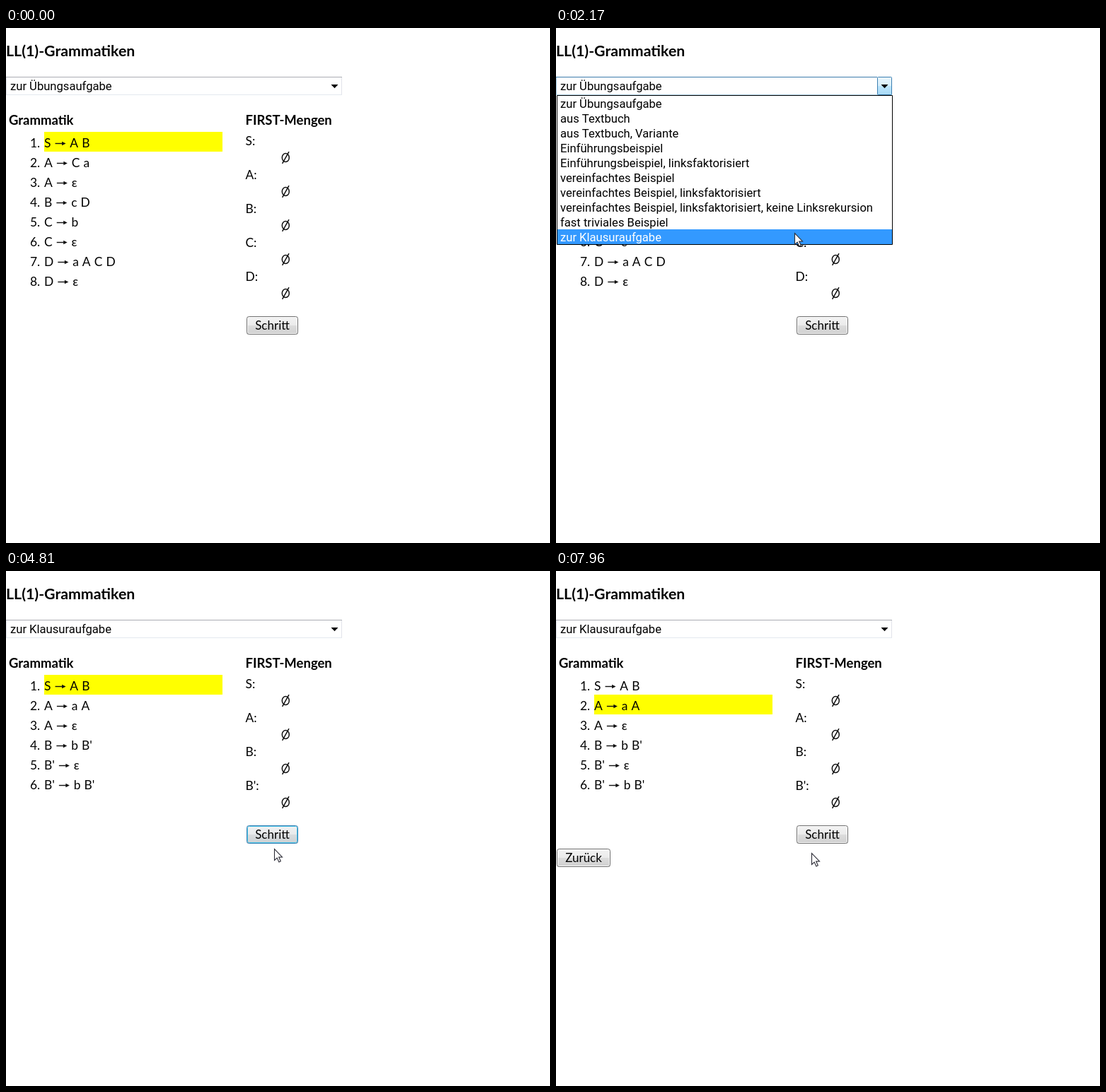
Animation, 769 px wide and 729 px high, one loop 7990 ms. Source, as an HTML page with a canvas:

```html
<!DOCTYPE html>
<html lang="de">
<head>
<meta charset="utf-8">
<title>LL(1)-Grammatiken</title>
<style>
html, body { margin: 0; width: 100%; height: 100%; overflow: hidden; background: #fff; }
canvas { display: block; }
</style>
</head>
<body>
<canvas id="stage" width="769" height="729"></canvas>
<script>
const ctx = document.getElementById('stage').getContext('2d');
const LOOP = 7990, STEP = 30;
const BODY = '17.4px Lato, "Open Sans", sans-serif';
const BOLD = 'bold 18.5px Lato, sans-serif';
const TITLE = 'bold 21.3px Lato, sans-serif';
const LABEL = '17px Lato, sans-serif';
const MENU = '16.6px Roboto, sans-serif';

const options = [
  'zur Übungsaufgabe', 'aus Textbuch', 'aus Textbuch, Variante',
  'Einführungsbeispiel', 'Einführungsbeispiel, linksfaktorisiert',
  'vereinfachtes Beispiel', 'vereinfachtes Beispiel, linksfaktorisiert',
  'vereinfachtes Beispiel, linksfaktorisiert, keine Linksrekursion',
  'fast triviales Beispiel', 'zur Klausuraufgabe'
];
const exercise = {
  rules: ['S → A B', 'A → C a', 'A → ε', 'B → c D', 'C → b', 'C → ε', 'D → a A C D', 'D → ε'],
  symbols: ['S', 'A', 'B', 'C', 'D']
};
const exam = {
  rules: ['S → A B', 'A → a A', 'A → ε', "B → b B'", "B' → ε", "B' → b B'"],
  symbols: ['S', 'A', 'B', "B'"]
};

// Pointer way points: time, x, y
const way = [
  [100, 722, 13], [400, 600, 58], [610, 498, 88], [730, 468, 82], [1630, 468, 82],
  [1810, 356, 223], [2170, 337, 290], [3130, 337, 290], [3460, 262, 360],
  [3640, 247, 395], [3880, 277, 416], [3940, 305, 442], [4180, 350, 469],
  [4540, 404, 430], [4750, 390, 403], [4810, 379, 393], [5230, 383, 368],
  [5740, 383, 368], [5770, 379, 368], [6010, 379, 368], [6550, 116, 210],
  [6670, 103, 190], [6760, 109, 205], [7450, 109, 205], [7720, 240, 449], [7960, 361, 399]
];

function slope(i, axis) {
  const a = way[i], b = way[i + 1];
  return a && b ? (b[axis] - a[axis]) / (b[0] - a[0]) : 0;
}

function tangent(i, axis) {
  const a = slope(i - 1, axis), b = slope(i, axis);
  return a * b > 0 ? 2 * a * b / (a + b) : 0;
}

// Monotone cubic interpolation, so that rests stay still
function pointer(t) {
  if (t <= way[0][0]) return way[0].slice(1);
  const i = way.findIndex((p, k) => k + 1 === way.length || t < way[k + 1][0]);
  if (i + 1 === way.length) return way[i].slice(1);
  const span = way[i + 1][0] - way[i][0], u = (t - way[i][0]) / span;
  return [1, 2].map(axis =>
    way[i][axis] * (1 + 2 * u) * (1 - u) ** 2 +
    way[i + 1][axis] * u * u * (3 - 2 * u) +
    span * u * (1 - u) * (tangent(i, axis) * (1 - u) - tangent(i + 1, axis) * u));
}

function text(str, x, y, font, color = '#000', align = 'left') {
  ctx.font = font;
  ctx.fillStyle = color;
  ctx.textAlign = align;
  ctx.fillText(str, x, y);
}

function rect(x, y, w, h, color) {
  ctx.fillStyle = color;
  ctx.fillRect(x, y, w, h);
}

function shape(points, fill) {
  ctx.beginPath();
  for (const [x, y] of points) ctx.lineTo(x, y);
  ctx.closePath();
  ctx.fillStyle = fill;
  ctx.fill();
}

function shade(y, h, colors) {
  const g = ctx.createLinearGradient(0, y, 0, y + h);
  [0, 0.5, 0.5, 1].forEach((stop, i) => g.addColorStop(stop, colors[i]));
  return g;
}

function frame(x, y, w, h, r, color) {
  ctx.beginPath();
  ctx.roundRect(x + 0.5, y + 0.5, w - 1, h - 1, r);
  ctx.strokeStyle = color;
  ctx.lineWidth = 1;
  ctx.stroke();
}

const looks = {
  normal: { fill: ['#f3f3f3', '#ebebeb', '#dddddd', '#cfcfcf'], edge: '#707070', inner: '#fafafa' },
  focus: { fill: ['#f0f2f3', '#e8eaeb', '#dadddf', '#cbd0d2'], edge: '#3c7fb1', inner: '#48c4e8' },
  hover: { fill: ['#eaf6fd', '#d9f0fc', '#bee6fd', '#a7d9f5'], edge: '#3c7fb1', inner: '#f0faff' },
  press: { fill: ['#e5f4fc', '#c4e5f6', '#98d1ef', '#68b3db'], edge: '#2c628b', inner: '#9eb0ba' }
};

function button(label, x, y, w, h, look) {
  const { fill, edge, inner } = looks[look];
  ctx.beginPath();
  ctx.roundRect(x, y, w, h, 3);
  ctx.fillStyle = shade(y, h, fill);
  ctx.fill();
  frame(x + 1, y + 1, w - 2, h - 2, 2, inner);
  frame(x, y, w, h, 3, edge);
  text(label, x + w / 2, y + 19, LABEL, '#000', 'center');
}

function arrow(x, y) {
  rect(x, y - 0.7, 11, 1.4, '#111');
  shape([[x + 9.5, y - 2.7], [x + 15, y], [x + 9.5, y + 2.7]], '#111');
}

function rule(str, n, active) {
  const y = 169 + 28 * n;
  if (active) rect(54, y - 22, 252, 28, '#ff0');
  text(n + 1 + '.', 34, y, BODY);
  let x = 54;
  for (const part of str.split(' ')) {
    if (part === '→') {
      arrow(x + 1, y - 5.5);
      x += 21.8;
    } else {
      text(part, x, y, BODY);
      x += ctx.measureText(part).width + 5.1;
    }
  }
}

function emptySet(x, y) {
  ctx.strokeStyle = '#111';
  ctx.lineWidth = 1.5;
  ctx.beginPath();
  ctx.ellipse(x, y, 5, 6, 0, 0, 7);
  ctx.moveTo(x - 4.7, y + 8.3);
  ctx.lineTo(x + 4.7, y - 8.3);
  ctx.stroke();
}

function select(value, hot, pressed) {
  const [top, side, bottom] = hot
    ? ['#3d7bad', '#a4c9e3', '#b7d9ed']
    : ['#abadb3', '#e2e3ea', '#e3e9ef'];
  rect(0, 69, 475, 26, '#fff');
  frame(0, 69, 475, 26, 0, side);
  rect(0, 94, 475, 1, bottom);
  rect(0, 69, 475, 1, top);
  if (hot) {
    const { fill, edge } = looks[pressed ? 'press' : 'hover'];
    rect(454, 69, 21, 26, shade(69, 26, fill));
    frame(454, 69, 21, 26, 1, edge);
  }
  text(value, 6, 88, MENU);
  shape([[459.5, 80], [469.5, 80], [464.5, 85.2]], '#000');
}

function menu(active) {
  rect(1, 95, 475, 212, '#fff');
  frame(1, 95, 475, 212, 0, '#000');
  options.forEach((name, i) => {
    if (i === active) rect(2, 96 + 21 * i, 473, 21, '#39f');
    text(name, 6, 113 + 21 * i, MENU, i === active ? '#fff' : '#000');
  });
}

function cursor([x, y]) {
  ctx.save();
  ctx.translate(Math.round(x) + 0.5, Math.round(y) + 0.5);
  shape([[0, 0], [0, 16], [3.7, 12.6], [6.4, 18.4], [8.8, 17.3], [6.2, 11.6], [11, 11.4]], '#fff');
  ctx.strokeStyle = '#2b2b35';
  ctx.lineWidth = 1.1;
  ctx.stroke();
  ctx.restore();
}

function draw(t) {
  const at = pointer(t);
  const open = t >= 910 && t < 2560;
  const data = t < 2710 ? exercise : exam;
  const step = t < 7030 ? 0 : 1;

  rect(0, 0, 769, 729, '#fff');
  text('LL(1)-Grammatiken', 0, 40, TITLE);
  text('Grammatik', 4, 137, BOLD);
  text('FIRST-Mengen', 338.5, 137, BOLD);
  data.rules.forEach((r, i) => rule(r, i, i === step));
  data.symbols.forEach((s, i) => {
    text(s + ':', 338.5, 166 + 48 * i, BODY);
    emptySet(395.3, 183.5 + 48 * i);
  });

  const top = 168 + 48 * data.symbols.length;
  const over = at[0] >= 340 && at[0] < 413 && at[1] >= top && at[1] < top + 26;
  let look = t >= 2770 && t < 6760 ? 'focus' : 'normal';
  if (over) look = t >= 5620 ? 'press' : 'hover';
  button('Schritt', 340, top, 73, 26, look);
  if (step) button('Zurück', 1, 393, 76, 26, 'normal');

  const hot = open || (t >= 100 && t < 2560 && at[0] < 475 && at[1] > 69);
  select(options[t < 2560 ? 0 : 9], hot, t >= 880 && t < 1330);
  if (open) {
    const row = Math.floor((pointer(t - STEP)[1] - 96) / 21);
    menu(Math.max(0, Math.min(9, row)));
  }
  if (t >= 100) cursor(at);
}

const start = performance.now();
function tick() {
  const t = (performance.now() - start) % LOOP;
  draw(Math.floor((t - 10) / STEP) * STEP + 10);
  requestAnimationFrame(tick);
}
tick();
</script>
</body>
</html>
```
